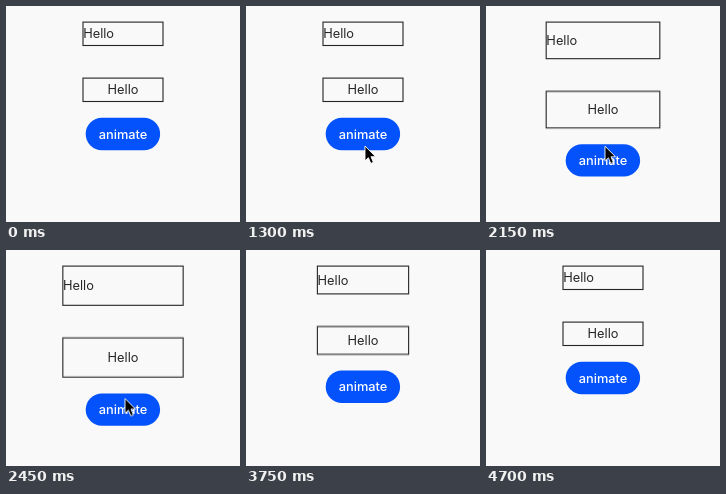
Animation, 234 px wide and 216 px high, one loop 4.75 s. Source, as an HTML page:

```html
<!DOCTYPE html>
<html lang="en">
<head>
<meta charset="utf-8">
<title>Animated boxes</title>
<style>
  html, body { margin: 0; width: 100%; height: 100%; overflow: hidden; background: #f9f9f9; }
  svg { display: block; width: 234px; height: 216px; font: 12.8px Inter, "Noto Sans", sans-serif; }

  .box, .label, .second, .button, .pill, .cursor { animation: 4750ms linear infinite; }
  .box { fill: none; stroke: #242424; stroke-width: 1.1px; animation-name: grow; }
  .label { fill: #262626; animation-name: shift; }
  .left { --dx: -20.4px; }
  .mid { --dx: 0px; text-anchor: middle; }
  .second { --dy: 16px; animation-name: drop; }
  .button { --dy: 32px; animation-name: drop; }
  .button text { fill: #fff; font-weight: 500; text-anchor: middle; }
  .pill { fill: #0352fb; animation-name: press; }
  .cursor { fill: #000; stroke: #fff; stroke-width: .9px; animation-name: point; }

  /* Each resize takes 900 ms: out from 1680 ms, back from 3363 ms */
  @keyframes grow {
    0%, 35.37% { x: 77px; width: 80px; height: 23.4px; animation-timing-function: ease; }
    54.32%, 70.8% { x: 56.6px; width: 120.8px; height: 39.4px; animation-timing-function: ease; }
    89.75%, 100% { x: 77px; width: 80px; height: 23.4px; }
  }
  @keyframes shift {
    0%, 35.37% { transform: translate(0, 0); animation-timing-function: ease; }
    54.32%, 70.8% { transform: translate(var(--dx), 8px); animation-timing-function: ease; }
    89.75%, 100% { transform: translate(0, 0); }
  }
  @keyframes drop {
    0%, 35.37% { transform: translateY(0); animation-timing-function: ease; }
    54.32%, 70.8% { transform: translateY(var(--dy)); animation-timing-function: ease; }
    89.75%, 100% { transform: translateY(0); }
  }
  @keyframes press {
    0%, 31.7%, 37.5%, 66.32%, 72.8%, 100% { fill: #0352fb; }
    33.4%, 35.37%, 68%, 70.8% { fill: #0749e2; }
  }
  @keyframes point {
    0% { transform: translate(122px, 192px); opacity: 0; animation-timing-function: step-end; }
    17.85% { transform: translate(122px, 192px); opacity: 1; animation-timing-function: ease-out; }
    26.32%, 44.21% { transform: translate(119px, 140px); opacity: 1; animation-timing-function: ease-in-out; }
    60%, 70.32% { transform: translate(119px, 159px); opacity: 1; animation-timing-function: ease-in; }
    77.9% { transform: translate(120px, 196px); opacity: 1; animation-timing-function: step-end; }
    78.3%, 100% { transform: translate(120px, 196px); opacity: 0; }
  }
</style>
</head>
<body>
<svg viewBox="0 0 234 216">
  <rect class="box" x="77" y="16.1" width="80" height="23.4"/>
  <text class="label left" x="77.2" y="32.4">Hello</text>

  <g class="second">
    <rect class="box" x="77" y="72.1" width="80" height="23.4"/>
    <text class="label mid" x="117" y="88.4">Hello</text>
  </g>

  <g class="button">
    <rect class="pill" x="79.7" y="111.8" width="74.4" height="32.4" rx="16.2"/>
    <text x="117" y="132.5">animate</text>
  </g>

  <path class="cursor" d="M0 0V14.8L3.4 11.7L5.8 17.4L8.4 16.3L6 10.7H10.6Z"/>
</svg>
</body>
</html>
```
